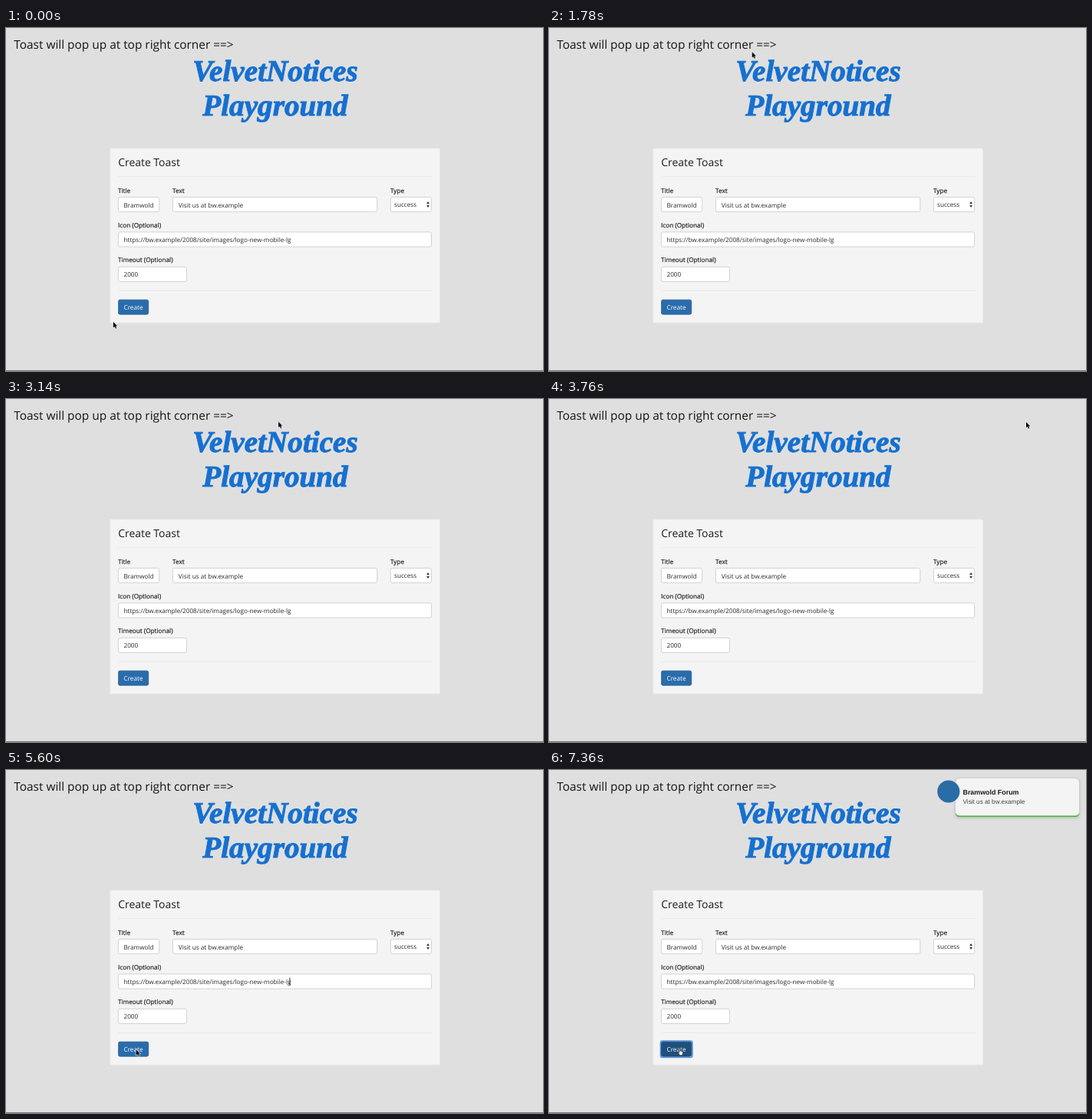
Write an HTML page that moves like this. It is 700 by 447 pixels and loops after 8 s.

```html
<!DOCTYPE html>
<html lang="en">
<head>
<meta charset="utf-8">
<title>Toast playground</title>
<style>
  html, body { margin: 0; width: 100%; height: 100%; overflow: hidden; background: #dfdfdf; }
  svg { display: block; width: 100vw; height: 100vh; }
  text { font: 8.2px "Open Sans", sans-serif; fill: #2a2a2a; text-rendering: geometricPrecision; }
  .label { fill: #1c1c1c; stroke: #1c1c1c; stroke-width: .18px; }
  .intro { font-size: 15.42px; fill: #151515; }
  .logo { font: italic bold 39.2px "Liberation Serif", serif; fill: #1670d0; stroke: #1670d0; stroke-width: 1px; text-anchor: middle; }
  .head { font-size: 13.95px; fill: #1c1c1c; }
  .box { fill: #fff; stroke: #c8c8c8; stroke-width: .8px; }
  .rule { stroke: #e6e6e6; stroke-width: .8px; }

  .field, .caret, .btn, .ring, .arrow, .hand, .toast { animation: 8s linear infinite; }
  .field { animation-name: focus; }
  .caret { animation-name: caret; animation-timing-function: step-end; }
  .btn { animation-name: press; animation-timing-function: step-end; }
  .ring { animation-name: ring; animation-timing-function: step-end; }
  .arrow { animation-name: arrow; animation-timing-function: step-end; }
  .hand { animation-name: hand; animation-timing-function: step-end; }
  .toast { animation-name: slide; }

  @keyframes focus { 0%, 70% { stroke: #c8c8c8; } 72%, 75% { stroke: #66afe9; } 77.25%, 100% { stroke: #c8c8c8; } }
  @keyframes caret { 0% { opacity: 0; } 70% { opacity: 1; } 75%, 100% { opacity: 0; } }
  @keyframes press { 0% { fill: #2a6cab; stroke: #255f97; } 80%, 100% { fill: #1f4f7d; stroke: #183f66; } }
  @keyframes ring { 0% { opacity: 0; } 80%, 100% { opacity: 1; } }
  @keyframes arrow { 0% { opacity: 1; } 75%, 100% { opacity: 0; } }
  @keyframes hand { 0% { opacity: 0; } 75%, 100% { opacity: 1; } }
  @keyframes slide {
    0% { transform: translateX(190px); opacity: 0; }
    80% { transform: translateX(190px); opacity: 0; animation-timing-function: cubic-bezier(.333, 1, .667, 1); }
    89.6%, 100% { transform: none; opacity: 1; }
  }

  .card { filter: drop-shadow(0 1px 2px rgba(0, 0, 0, .2)); }
  .toast text { font: 8.2px "Liberation Sans", Arial, sans-serif; fill: #444; }
  .toast .title { font-weight: bold; font-size: 8.9px; fill: #1a1a1a; }
</style>
</head>
<body>
<svg viewBox="0 0 700 447" preserveAspectRatio="none">
  <clipPath id="clip"><rect x="153" y="221" width="40.3" height="18"/></clipPath>

  <rect width="700" height="447" fill="#dfdfdf"/>
  <rect y="446" width="700" height="1" fill="#777"/>
  <text class="intro" x="10.3" y="27.4">Toast will pop up at top right corner ==&gt;</text>
  <text class="logo" x="351" y="69">VelvetNotices</text>
  <text class="logo" x="351" y="113.5">Playground</text>

  <rect x="135.7" y="157" width="429.8" height="227.2" rx="1" fill="#f4f4f4" stroke="#ebebeb" stroke-width=".6"/>
  <text class="head" x="146.2" y="179.8">Create Toast</text>
  <path class="rule" d="M146 193.7H556M146 342.3H556"/>

  <text class="label" x="146" y="214.5">Title</text>
  <text class="label" x="217" y="214.5">Text</text>
  <text class="label" x="501" y="214.5">Type</text>
  <text class="label" x="146" y="259.9">Icon (Optional)</text>
  <text class="label" x="146" y="305.3">Timeout (Optional)</text>

  <rect class="box" x="146.4" y="220.4" width="53.2" height="19.2" rx="2.2"/>
  <rect class="box" x="217.4" y="220.4" width="266.4" height="19.2" rx="2.2"/>
  <rect class="box" x="501.4" y="220.4" width="53.2" height="19.2" rx="2.2"/>
  <rect class="box field" x="146.4" y="265.9" width="408.2" height="19.2" rx="2.2"/>
  <rect class="box" x="146.4" y="311.3" width="89" height="19.2" rx="2.2"/>

  <text x="153.5" y="233.5" clip-path="url(#clip)">Bramwold Forum</text>
  <text x="224.8" y="233.5">Visit us at bw.example</text>
  <text x="506" y="232.8">success</text>
  <path d="M548.2 229L550.1 226 552 229ZM548.2 231L550.1 234 552 231Z" fill="#333"/>
  <text x="153.5" y="279">https://bw.example/2008/site/images/logo-new-mobile-lg</text>
  <path class="caret" d="M370 270.5V280.8" stroke="#111" stroke-width=".8"/>
  <text x="153.5" y="324.4">2000</text>

  <rect class="ring" x="145.4" y="353" width="41.5" height="21.5" rx="2.6" fill="none" stroke="#4f94e8" stroke-width="1.6"/>
  <rect class="btn" x="146.4" y="354.2" width="39.3" height="19" rx="2.2" stroke-width=".8"/>
  <text x="153.5" y="367" style="fill:#fff">Create</text>

  <g class="toast">
    <g class="card">
      <rect x="530" y="11" width="161" height="50" rx="4.5" fill="#3bbb2b"/>
      <rect x="530" y="11" width="161" height="48.4" rx="4.5" fill="#f4f4f4"/>
    </g>
    <circle cx="520.8" cy="28" r="14.6" fill="#2a6ca6"/>
    <text class="title" x="539.5" y="31.8">Bramwold Forum</text>
    <text x="539.5" y="44">Visit us at bw.example</text>
  </g>

  <g id="cursor">
    <path class="arrow" d="M0 0V7.6L1.8 6 3 8.8 4.3 8.2 3.1 5.5H5.4Z" fill="#000" stroke="#fff" stroke-width="1.1" stroke-linejoin="round" paint-order="stroke"/>
    <path class="hand" d="M.1-1.2Q.9-2.2 1.6-1.1V2L3 2.2 4.3 2.6Q5.2 2.8 5 4.2L4.3 7.6H.9L-1.3 4.3Q-1.2 3 .1 4Z" fill="#fff" stroke="#111" stroke-width=".7" stroke-linejoin="round"/>
  </g>
</svg>
<script>
  const LOOP = 8000;
  // time, x, y of the pointer tip
  const stops = [
    [300, 139.8, 383], [520, 225, 235], [720, 312, 90], [850, 320, 44], [1000, 190, 40],
    [1160, 103.5, 66], [1350, 125, 62], [1600, 235, 42], [1800, 262, 30], [2000, 165, 18],
    [2200, 110, 30], [2400, 167.5, 45], [2560, 265, 38], [2700, 296, 32], [3000, 296, 32],
    [3300, 470, 26], [3600, 628, 27], [3760, 622, 30], [3900, 604, 44], [4250, 360, 225],
    [4620, 174, 357], [5000, 170.5, 364.3], [5340, 169.6, 364.3]
  ];
  const cursor = document.getElementById("cursor");

  // Cubic Hermite between stops, at rest where the pointer pauses
  function slope(i, axis) {
    const a = stops[i - 1], b = stops[i], c = stops[i + 1];
    if (!a || !c || a[1] === b[1] || b[1] === c[1]) return 0;
    return (c[axis] - a[axis]) / (c[0] - a[0]);
  }

  function place(t) {
    const last = stops.length - 1;
    if (t <= stops[0][0]) return stops[0].slice(1);
    if (t >= stops[last][0]) return stops[last].slice(1);
    const i = stops.findIndex(s => s[0] > t) - 1;
    const p = stops[i], q = stops[i + 1], d = q[0] - p[0], u = (t - p[0]) / d;
    return [1, 2].map(k =>
      p[k] + (q[k] - p[k]) * u * u * (3 - 2 * u) +
      d * u * (1 - u) * (slope(i, k) * (1 - u) - slope(i + 1, k) * u));
  }

  let start;
  function draw(now) {
    start ??= now;
    const [x, y] = place((now - start) % LOOP);
    cursor.setAttribute("transform", `translate(${x.toFixed(2)} ${y.toFixed(2)})`);
    requestAnimationFrame(draw);
  }
  requestAnimationFrame(draw);
</script>
</body>
</html>
```
